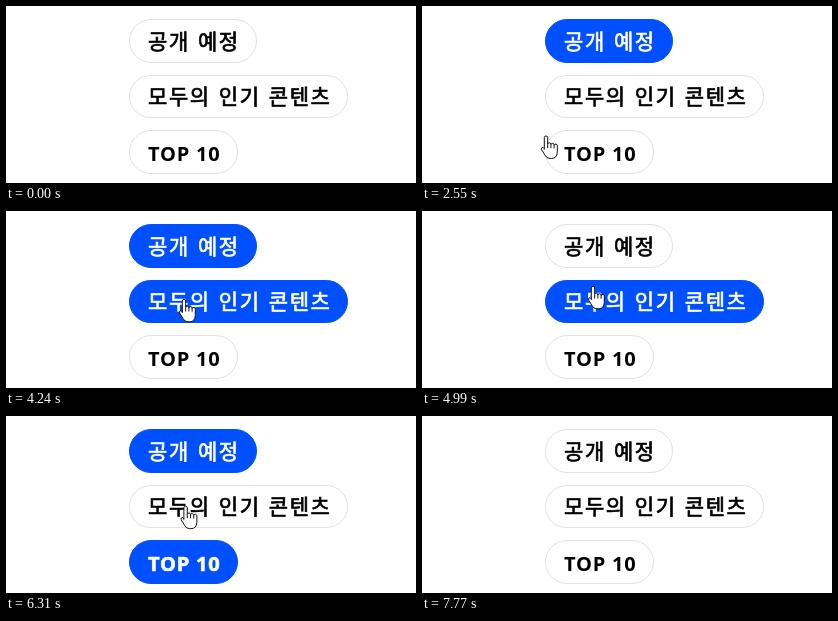
Animation of 410x177 px, one loop 8.17 s. Source, as an HTML page:

```html
<!DOCTYPE html>
<html lang="ko">
<meta charset="utf-8">
<style>
  html, body { margin: 0; width: 100%; height: 100%; overflow: hidden; background: #fff; }
  svg { display: block; width: 410px; height: 177px; }
  rect { fill: #fff; stroke: #e2e2e2; }
  text { font: 400 21px "Noto Sans CJK KR", "Noto Sans CJK JP", "Noto Sans CJK", sans-serif; letter-spacing: 1.6px; word-spacing: .6px; fill: #000; stroke: #000; stroke-width: .7; }
  text.latin { font: 700 20px "Open Sans", "Noto Sans", sans-serif; letter-spacing: .8px; word-spacing: 0; stroke: none; }
  .on rect { fill: #0050ff; stroke: #0050ff; }
  .on text { fill: #fff; stroke: #fff; }
  #cursor path { fill: #fff; stroke: #111; stroke-linejoin: round; }
</style>
<svg viewBox="0 0 410 177">
  <g id="pills"></g>
  <g id="cursor">
    <circle id="ring" cy="-.5" r="12" fill="#fe0" fill-opacity=".7"/>
    <path id="hand" d="M-1.7 14V2a1.7 1.7 0 0 1 3.4 0V8.5a1.6 1.6 0 0 1 3.2 .5a1.6 1.6 0 0 1 3.2 .7a1.6 1.6 0 0 1 3.2 .8V16.5Q11 22.8 5.5 22.8H4Q.5 22.8 -1 19.5L-4.4 14Q-5 11.5 -3 11.7L-1.7 13M1.7 8.5v4M4.9 9v3.5M8.1 9.7v3"/>
    <path id="arrow" d="M.5 .5V16.5L4.2 13 6.7 18.7 9 17.7 6.5 12H11.5Z"/>
  </g>
</svg>
<script>
const LOOP = 8170, ENTER = 200, LEAVE = 7770;
const PRESS = 130;  // ms the button is held before a pill toggles
const PACE = 6;     // ms of travel per pixel
const $ = id => document.getElementById(id);

const pills = [
  { y: 13, w: 128, h: 44, base: 42.5, label: '공개 예정' },
  { y: 69, w: 219, h: 43, base: 97.5, label: '모두의 인기 콘텐츠' },
  { y: 124, w: 109, h: 44, base: 154.5, label: 'TOP 10', cls: 'latin' }
];
$('pills').innerHTML = pills.map(p => `<g>
  <rect x="123.5" y="${p.y + .5}" width="${p.w - 1}" height="${p.h - 1}" rx="${(p.h - 1) / 2}"/>
  <text class="${p.cls || ''}" x="142" y="${p.base}">${p.label}</text></g>`).join('');
const groups = [...$('pills').children];

// time, x, y, and the pill toggled there, if any
const stops = [
  [ENTER, 351, 170], [970, 231, 100], [1380, 192, 45], [1850, 194, 45, 0],
  [2380, 113, 116], [2810, 138, 147, 2], [3630, 143, 152, 2], [4240, 178, 88, 1],
  [4850, 190, 40, 0], [4990, 171, 75], [5400, 170, 88, 1], [5890, 184, 39, 0],
  [6240, 168, 140, 2], [6450, 180, 88, 1], [6790, 182, 138, 2], [7000, 186, 77, 1],
  [7210, 194, 42, 0], [7420, 240, 63], [LEAVE, 386, 184]
].map(([t, x, y, pill]) => ({ t, x, y, pill, press: pill === undefined ? t : t - PRESS }));

// Rest at the last stop, then travel just in time for the next press.
function tip(t) {
  const i = stops.findIndex(s => s.t > t);
  const a = stops[i - 1], b = stops[i];
  const travel = Math.min(b.press - a.t, PACE * Math.hypot(b.x - a.x, b.y - a.y));
  const k = Math.min(1, Math.max(0, 1 - (b.press - t) / travel));
  const e = k * k * (3 - 2 * k);
  return [a.x + (b.x - a.x) * e, a.y + (b.y - a.y) * e];
}

const show = (el, on) => el.style.display = on ? '' : 'none';

function draw() {
  const t = performance.now() % LOOP;
  groups.forEach((g, i) => {
    const toggles = stops.filter(s => s.pill === i && t >= s.t).length;
    g.classList.toggle('on', toggles % 2 === 1);
  });
  const visible = t >= ENTER && t < LEAVE;
  show($('cursor'), visible);
  if (visible) {
    const [x, y] = tip(t);
    const over = pills.some(p => x >= 123 && x < 123 + p.w && y >= p.y && y < p.y + p.h);
    $('cursor').setAttribute('transform', `translate(${x} ${y})`);
    show($('hand'), over);
    show($('arrow'), !over);
    show($('ring'), stops.some(s => t >= s.press && t < s.t));
  }
  requestAnimationFrame(draw);
}
draw();
</script>
</html>
```
